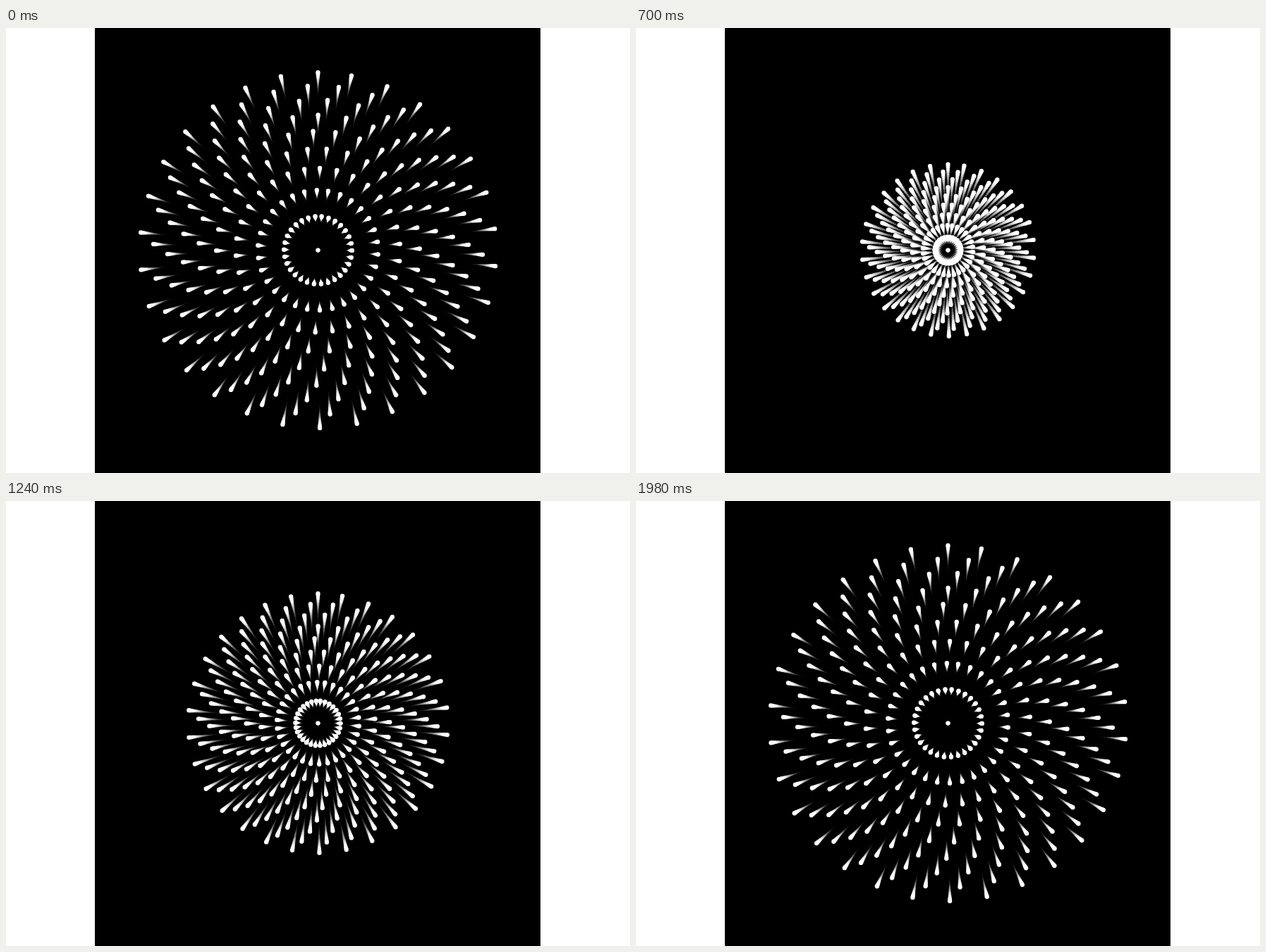
These frames come from a looping animation (885 px wide and 632 px high, 2 s). An HTML page with a canvas:

```html
<!DOCTYPE html>
<html>
<head>
<meta charset="utf-8">
<style>
  html, body { margin: 0; overflow: hidden; background: #fff; }
  canvas { display: block; }
</style>
</head>
<body>
<canvas width="885" height="632"></canvas>
<script>
const ctx = document.querySelector('canvas').getContext('2d');
const CX = 442.5, CY = 315.6;
const RINGS = 9, DOTS = 30, STEP = 12.04, TWIST = 3.6;
const LAST = 99, TRAIL = 28, HEAD = 3.15;

// Fixed direction of every dot, clockwise from the top
const dots = [];
for (let ring = 1; ring <= RINGS; ring++) {
  const start = ((RINGS - ring) * TWIST) % STEP;
  for (let i = 0; i < DOTS; i++) {
    const a = -(start + i * STEP) * Math.PI / 180;
    dots.push({ ring, x: Math.sin(a), y: -Math.cos(a) });
  }
}

function disc(x, y, r) {
  ctx.moveTo(x + r, y);
  ctx.arc(x, y, r, 0, 2 * Math.PI);
}

// All dots as they were at one step, filled as a single shape
function drawStep(step, size, alpha) {
  ctx.globalAlpha = alpha;
  ctx.beginPath();
  disc(CX, CY, size);
  for (const d of dots) {
    const r = 116.8 * (Math.sqrt(1 + d.ring * step / LAST) - 1);
    disc(CX + r * d.x, CY + r * d.y, size);
  }
  ctx.fill();
}

function draw(now) {
  const step = Math.floor(now / 20) % (LAST + 1) || LAST;
  ctx.globalAlpha = 1;
  ctx.fillStyle = '#fff';
  ctx.fillRect(0, 0, 885, 632);
  ctx.fillStyle = '#000';
  ctx.fillRect(126, 0, 632, 632);
  ctx.fillStyle = '#fff';
  // Older positions are smaller and fainter
  for (let k = Math.min(TRAIL, step); k >= 0; k--) {
    const s = 1 - k / (TRAIL + 1);
    drawStep(step - k, HEAD * s ** 1.8, s * s);
  }
}

let begin;
function tick(now) {
  begin ??= now;
  draw(now - begin);
  requestAnimationFrame(tick);
}
draw(0);
requestAnimationFrame(tick);
</script>
</body>
</html>
```
